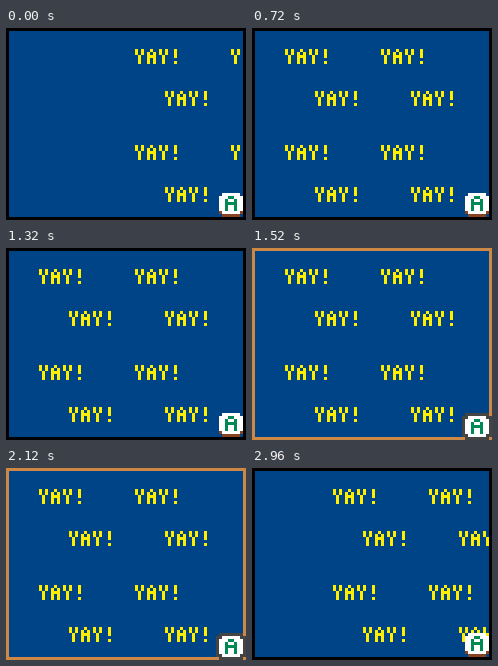
Recreate the animation shown at these times as an HTML page with a canvas. Size 240 px wide and 192 px high, loop 3000 ms.

```html
<!DOCTYPE html>
<html lang="en">
<head>
<meta charset="utf-8">
<title>Yay</title>
<style>
html, body { margin: 0; width: 100%; height: 100%; overflow: hidden; background: #048; }
canvas { display: block; width: 240px; height: 192px; image-rendering: pixelated; }
</style>
</head>
<body>
<canvas id="stage" width="240" height="192" aria-label="YAY!"></canvas>
<script>
const ctx = document.getElementById('stage').getContext('2d');
const CELL = 3, COLS = 80, ROWS = 64;
const LOOP = 3000, STEP = 40;

const YAY = [
  '#.#..#..#.#..#',
  '#.#.#.#.#.#..#',
  '.#..###..#...#',
  '.#..#.#..#....',
  '.#..#.#..#...#'
];
const LETTER_A = ['.##.', '#..#', '####', '#..#', '#..#'];

function box(x, y, w, h, color) {
  ctx.fillStyle = color;
  ctx.fillRect(x * CELL, y * CELL, w * CELL, h * CELL);
}

function glyphs(rows, x, y, color) {
  rows.forEach((row, j) => [...row].forEach((c, i) => {
    if (c === '#') box(x + i, y + j, 1, 1, color);
  }));
}

// Box without its four corner cells
function rounded(x, y, w, h, color) {
  box(x + 1, y, w - 2, h, color);
  box(x, y + 1, w, h - 2, color);
}

function frame(color) {
  box(0, 0, COLS, 1, color);
  box(0, ROWS - 1, COLS, 1, color);
  box(0, 0, 1, ROWS, color);
  box(COLS - 1, 0, 1, ROWS, color);
}

function button(pressed) {
  if (pressed) {
    rounded(70, 55, 10, 9, '#444');
    rounded(71, 56, 8, 7, '#fff');
    glyphs(LETTER_A, 73, 57, '#085');
  } else {
    rounded(71, 56, 8, 7, '#842');
    rounded(71, 55, 8, 7, '#fff');
    glyphs(LETTER_A, 73, 56, '#085');
  }
}

function draw(ms) {
  const n = Math.floor((ms % LOOP) / STEP);
  const lit = n % 8 >= 4;
  const shift = (n + 2) % 5 * 16;

  box(0, 0, COLS, ROWS, '#048');
  for (const y of [0, 32]) {
    for (const x of [0, 32]) {
      glyphs(YAY, 11 + x + shift, 7 + y, '#fe0');
      glyphs(YAY, 21 + x + shift, 21 + y, '#fe0');
    }
  }
  frame(lit ? '#c84' : '#000');
  button(lit);
}

const start = performance.now();
function tick() {
  draw(performance.now() - start);
  requestAnimationFrame(tick);
}
tick();
</script>
</body>
</html>
```
